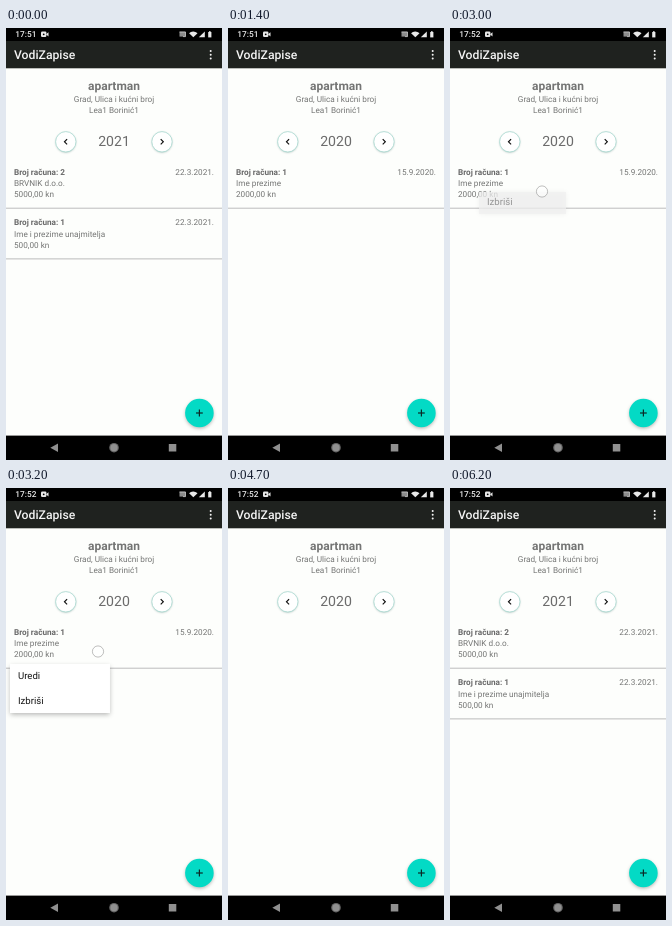
Recreate the animation shown at these times as an HTML page with a canvas. Size 216 by 432 pixels, loop 6.4 s.

```html
<!DOCTYPE html>
<html lang="hr">
<head>
<meta charset="utf-8">
<title>Računi</title>
<style>
html, body { margin: 0; width: 100%; height: 100%; overflow: hidden; background: #fdfefc; }
canvas { display: block; width: 216px; height: 432px; }
</style>
</head>
<body>
<canvas id="stage"></canvas>
<script>
const W = 216, H = 432, LOOP = 6400, STEP = 100;
const GREY = '#747574', PAGE = '#fdfefc', ICON = '#e8e8e8';
const canvas = document.getElementById('stage');
const ctx = canvas.getContext('2d');
const ratio = window.devicePixelRatio || 1;
canvas.width = W * ratio;
canvas.height = H * ratio;

const invoices = {
  2021: [
    ['2', '22.3.2021.', 'BRVNIK d.o.o.', '5000,00 kn'],
    ['1', '22.3.2021.', 'Ime i prezime unajmitelja', '500,00 kn']
  ],
  2020: [['1', '15.9.2020.', 'Ime prezime', '2000,00 kn']]
};

// x, y, from, to
const touches = [
  [61.5, 113, 700, 1000],
  [92, 163.5, 2500, 4100],
  [26, 216, 3800, 4300],
  [158, 115.5, 5600, 5900]
];

const ramp = (t, a, b) => Math.min(1, Math.max(0, (t - a) / (b - a)));

function text(s, x, y, size, color, weight = 400, align = 'left') {
  ctx.font = `${weight} ${size}px Roboto, sans-serif`;
  ctx.textRendering = 'geometricPrecision';
  ctx.textAlign = align;
  ctx.fillStyle = color;
  ctx.fillText(s, x, y);
}

function rect(x, y, w, h, color) {
  ctx.fillStyle = color;
  ctx.fillRect(x, y, w, h);
}

function disc(x, y, r, color) {
  ctx.beginPath();
  ctx.arc(x, y, r, 0, Math.PI * 2);
  ctx.fillStyle = color;
  ctx.fill();
}

function ring(x, y, r, color, width) {
  ctx.beginPath();
  ctx.arc(x, y, r, 0, Math.PI * 2);
  ctx.strokeStyle = color;
  ctx.lineWidth = width;
  ctx.stroke();
}

function poly(points, color) {
  ctx.beginPath();
  points.forEach(p => ctx.lineTo(...p));
  ctx.closePath();
  ctx.fillStyle = color;
  ctx.fill();
}

function line(points, color, width) {
  ctx.beginPath();
  points.forEach(p => ctx.lineTo(...p));
  ctx.strokeStyle = color;
  ctx.lineWidth = width;
  ctx.stroke();
}

function shadow(color, blur, dy) {
  ctx.shadowColor = color;
  ctx.shadowBlur = blur * ratio;
  ctx.shadowOffsetY = dy * ratio;
}

function faded(alpha, draw) {
  if (alpha <= 0) return;
  ctx.save();
  ctx.globalAlpha *= alpha;
  draw();
  ctx.restore();
}

function statusBar(t) {
  rect(0, 0, W, 13, '#000');
  text(t >= 2200 ? '17:52' : '17:51', 9.3, 9.4, 8.3, ICON, 500);
  ctx.beginPath();
  ctx.roundRect(35, 3.6, 5.4, 5.4, 1.2);
  ctx.fillStyle = ICON;
  ctx.fill();
  poly([[40, 6.3], [42.5, 4.2], [42.5, 8.4]], ICON);
  disc(37.7, 6.3, 0.9, '#000');

  rect(173.5, 3.8, 6, 4.8, '#8c8c8c');
  line([[173.5, 4], [179.5, 4], [179.5, 8.6], [177, 8.6]], '#ccc', 0.8);
  ctx.beginPath();
  ctx.moveTo(187.3, 9.3);
  ctx.arc(187.3, 9.3, 5.8, -Math.PI * 0.76, -Math.PI * 0.24);
  ctx.fillStyle = ICON;
  ctx.fill();
  poly([[192.8, 9.3], [198.8, 3.5], [198.8, 9.3]], ICON);
  rect(202.2, 4, 3.2, 5.4, ICON);
  rect(203, 3.2, 1.6, 0.9, ICON);
}

function toolbar() {
  rect(0, 13, W, 27.3, '#1f221f');
  text('VodiZapise', 8, 31.2, 12.2, '#f4f4f4', 500);
  [23, 26.7, 30.4].forEach(y => disc(204.7, y, 1, '#f4f4f4'));
}

function arrowButton(x, dir, press) {
  ctx.save();
  shadow('rgba(0,70,60,.3)', 2, 0.7);
  disc(x, 113.8, 10.2, '#fff');
  ctx.restore();
  ring(x, 113.8, 10.2, '#b0dcd4', 0.9);
  faded(press, () => disc(x, 113.8, 9.8, 'rgba(0,0,0,.12)'));
  const d = 1.3 * dir;
  line([[x - d, 111.2], [x + d, 113.8], [x - d, 116.4]], '#111', 1.2);
}

function header(t) {
  const year = t >= 1000 && t < 5900 ? 2020 : 2021;
  text('apartman', 108, 61.8, 12, GREY, 700, 'center');
  text('Grad, Ulica i kućni broj', 108, 73.6, 8.2, GREY, 400, 'center');
  text('Lea1 Borinić1', 108, 84.8, 8.2, GREY, 400, 'center');
  text(year, 108, 118.2, 14.1, '#6c6c6c', 400, 'center');
  arrowButton(59.8, -1, t >= 900 ? 1 - ramp(t, 900, 1300) : 0);
  arrowButton(156, 1, t >= 5800 ? 1 - ramp(t, 5800, 6200) : 0);
}

function list(year) {
  invoices[year].forEach(([no, date, name, sum], i) => {
    const y = 146.7 + i * 50.6;
    text('Broj računa: ' + no, 8, y, 8.2, '#6a6a6a', 700);
    text(date, 208, y, 8.2, GREY, 400, 'right');
    text(name, 8, y + 11.3, 8.2, GREY);
    text(sum, 8, y + 22.4, 8.2, GREY);
    rect(0, y + 32.9, W, 1.3, '#cbcbcb');
  });
}

function lists(t) {
  const left = ramp(t, 800, 1200), back = ramp(t, 5700, 6100);
  faded(1 - left + back, () => list(2021));
  faded(left * (1 - ramp(t, 4300, 4700)), () => list(2020));
}

function menu(t) {
  if (t < 2900 || t >= 4700) return;
  const n = Math.max(0, (t - 3000) / STEP);
  const open = Math.min(1, n / 2);
  const x = n < 4 ? 29 * 0.37 ** n : 0;
  const y = 180 - (n < 4 ? 16 * 0.5 ** n : 0);
  const w = 87 + 13 * open, h = 22 + 27 * open;
  const alpha = t < 3000 ? 0.15 : 0.75 + 0.25 * open;

  faded(alpha * (1 - ramp(t, 4300, 4700)), () => {
    ctx.save();
    shadow(`rgba(0,0,0,${0.07 + 0.23 * open})`, 5, 1.5 * open);
    rect(x, y, w, h, open < 1 ? '#f0f0f0' : '#fff');
    ctx.restore();
    ctx.beginPath();
    ctx.rect(x, y, w, h);
    ctx.clip();
    if (t >= 4100) {
      const grow = ramp(t, 4000, 4300);
      const from = 26 * (1 - grow * grow);
      const to = 26 + 74 * Math.min(1, grow * 1.16);
      rect(from, 205, to - from, 22, '#e5e5e5');
    }
    const ink = open < 1 ? '#777' : '#151515';
    text('Uredi', x + 8, y + h - 33.6, 9.6, ink);
    text('Izbriši', x + 8, y + h - 9.4, 9.6, ink);
  });
}

function touch([x, y, from, to], t) {
  if (t < from || t >= to) return;
  disc(x, y, 5.6, 'rgba(255,255,255,.55)');
  ring(x, y, 5.6, 'rgba(120,120,120,.6)', 0.8);
}

function addButton() {
  ctx.save();
  shadow('rgba(0,0,0,.25)', 3.5, 1.5);
  disc(193.4, 385, 14.3, '#03dac5');
  ctx.restore();
  line([[190, 385], [196.8, 385]], '#0b2a27', 1.2);
  line([[193.4, 381.6], [193.4, 388.4]], '#0b2a27', 1.2);
}

function navBar() {
  rect(0, 407.6, W, 25, '#000');
  poly([[44.3, 419.7], [52, 415.4], [52, 424]], '#909090');
  disc(108, 419.7, 4.8, '#666');
  disc(108, 419.7, 3.6, '#909090');
  rect(162.8, 416, 7.5, 7.5, '#909090');
}

function draw(t) {
  ctx.setTransform(ratio, 0, 0, ratio, 0, 0);
  rect(0, 0, W, H, PAGE);
  header(t);
  lists(t);
  menu(t);
  addButton();
  toolbar();
  statusBar(t);
  navBar();
  touches.forEach(p => touch(p, t));
}

const start = performance.now();
function tick() {
  const t = (performance.now() - start) % LOOP;
  draw(Math.floor(t / STEP) * STEP);
  requestAnimationFrame(tick);
}
tick();
</script>
</body>
</html>
```
